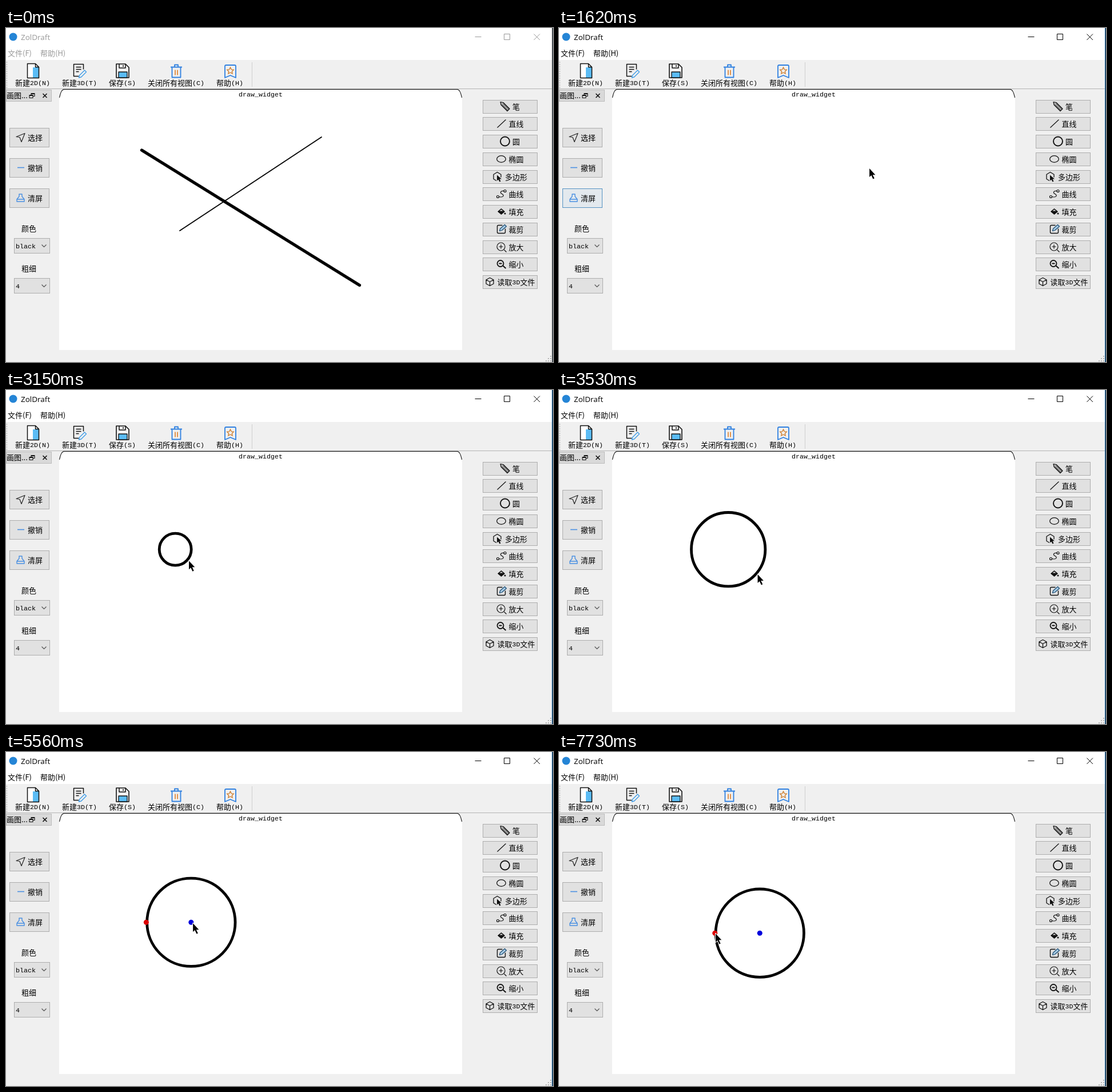
An HTML page with a canvas for the animation above (8000 ms loop, 957 by 585 pixels).

```html
<!DOCTYPE html>
<html lang="zh">
<head>
<meta charset="utf-8">
<title>Paint demo</title>
<style>
html, body { margin: 0; width: 100%; height: 100%; overflow: hidden; background: #f0f0f0; }
canvas { display: block; }
</style>
</head>
<body>
<canvas id="stage" width="957" height="585"></canvas>
<script>
const ctx = document.getElementById('stage').getContext('2d');
const LOOP = 8000;
const CJK = '"Noto Sans CJK SC", "Noto Sans CJK", sans-serif';
const MONO = '"Liberation Mono", monospace';
const BLUE = '#2f80e0', INK = '#111';

// Pointer moves; each starts where the previous one ended.
const MOVES = [
  { from: 300, to: 1000, x: 34, y: 307 },    // to the clear button
  { from: 1460, to: 1800, x: 893, y: 204 },  // to the circle button
  { from: 2230, to: 2380, x: 386, y: 311 },
  { from: 2380, to: 2760, x: 299, y: 281 },
  { from: 2920, to: 3760, x: 357, y: 331 },  // pull the radius
  { from: 3930, to: 4310, x: 300, y: 281 },
  { from: 5410, to: 5795, x: 354, y: 319 },  // drag the centre
  { from: 5795, to: 6100, x: 294, y: 313 },
  { from: 6100, to: 6420, x: 278, y: 317 },
  { from: 6420, to: 7730, x: 274, y: 318 },
];

const ramp = (t, from, to) => Math.min(1, Math.max(0, (t - from) / (to - from)));
const glide = (t, from, to) => 1 - (1 - ramp(t, from, to)) ** 1.4;
const lerp = (a, b, k) => a + (b - a) * k;
const blend = (a, b, k) => `rgb(${a.map((v, i) => Math.round(lerp(v, b[i], k))).join()})`;

function rect(x, y, w, h, fill, border) {
  ctx.fillStyle = fill;
  ctx.fillRect(x, y, w, h);
  if (border) {
    ctx.strokeStyle = border;
    ctx.lineWidth = 1;
    ctx.strokeRect(x + .5, y + .5, w - 1, h - 1);
  }
}

function shape(d, x, y, stroke, width = 1.4, fill) {
  const path = new Path2D(d);
  ctx.save();
  ctx.translate(x, y);
  ctx.lineJoin = 'round';
  if (fill) { ctx.fillStyle = fill; ctx.fill(path); }
  if (stroke) { ctx.strokeStyle = stroke; ctx.lineWidth = width; ctx.stroke(path); }
  ctx.restore();
}

function ring(x, y, rx, ry, stroke, width) {
  ctx.beginPath();
  ctx.ellipse(x, y, rx, ry, 0, 0, Math.PI * 2);
  ctx.strokeStyle = stroke;
  ctx.lineWidth = width;
  ctx.stroke();
}

function dot(x, y, r, fill) {
  ctx.beginPath();
  ctx.arc(x, y, r, 0, Math.PI * 2);
  ctx.fillStyle = fill;
  ctx.fill();
}

function star(x, y, r, color) {
  ctx.beginPath();
  for (let i = 0; i < 10; i++) {
    const a = (i / 5 - .5) * Math.PI, reach = i % 2 ? r / 2 : r;
    ctx.lineTo(x + Math.cos(a) * reach, y + Math.sin(a) * reach);
  }
  ctx.closePath();
  ctx.strokeStyle = color;
  ctx.lineWidth = 1.4;
  ctx.stroke();
}

function text(s, x, base, font, color = '#000') {
  ctx.font = font;
  ctx.fillStyle = color;
  ctx.fillText(s, x, base);
}

// Full-width characters advance 13 px, half-width ones 7 px.
const advance = s => [...s].reduce((sum, c) => sum + (c < '\x7f' ? 7 : 13), 0);

function label(s, x, mid) {
  for (const run of s.match(/[ -~]+|[^ -~]+/g)) {
    const latin = run < '\x7f';
    text(run, x, mid + (latin ? 4 : 5), latin ? `11.67px ${MONO}` : `13px ${CJK}`);
    x += advance(run);
  }
}

function button(x, y, w, h, hover = 0) {
  rect(x, y, w, h, blend([225, 225, 225], [229, 241, 251], hover), blend([173, 173, 173], [0, 120, 215], hover));
}

function drawTitle(active) {
  const ink = active ? '#000' : '#999';
  rect(0, 0, 957, 56, '#fff');
  dot(12.5, 15.5, 7, '#2585d6');
  text('ZolDraft', 26, 21, '13.5px "Open Sans", sans-serif', ink);
  text('文件(F)', 3, 49, `13px ${CJK}`, ink);
  text('帮助(H)', 60, 49, `13px ${CJK}`, ink);
  shape('M820.5 15.5h11M871.5 10.5h10v10h-10zM923.5 10.5l10.5 10.5M934 10.5l-10.5 10.5', 0, 0, ink, 1);
}

function drawToolbar() {
  for (let y = 59; y < 104; y += 4) rect(1, y, 1, 2, '#b4b4b4');
  rect(430, 60, 1, 43, '#cfcfcf');
  rect(0, 106, 955, 1, '#b4b4b4');

  shape('M0 0h14l6 6v19h-20z', 37.5, 62.5, null, 0, '#fff');
  rect(47, 69, 10, 18, '#5bbcf5');
  shape('M0 0h14l6 6v19h-20zM14 0v6h6', 37.5, 62.5, INK, 1.5);

  shape('M18 10v-9h-17v21h9M5 6h9M5 10h9M5 14h5', 117.5, 62.5, INK, 1.5);
  shape('M0 9l9-9 3 3-9 9-4 1z', 128.5, 74, '#3b9be8', 1.3, '#f0f0f0');

  shape('M1 0h16l6 6v18h-22z', 192, 63, INK, 1.6);
  shape('M5 24v-10h15v10z', 192, 63, INK, 1.3, '#5bbcf5');
  shape('M6 0v7h11v-7M13 2v3', 192, 63, INK, 1.5);

  shape('M0 4h20M7 4v-4h6v4M2.5 4v18h15v-18', 288, 64.5, BLUE, 1.8);
  shape('M8 9v9M12 9v9', 288, 64.5, '#e08a3c', 1.8);

  shape('M2 0h15q2 0 2 2v20l-9.5-4-9.5 4v-20q0-2 2-2z', 383, 65, BLUE, 1.8);
  star(392.5, 75, 6, '#d08030');

  label('新建2D(N)', 16, 96);
  label('新建3D(T)', 98, 96);
  label('保存(S)', 180, 96);
  label('关闭所有视图(C)', 248, 96);
  label('帮助(H)', 368, 96);
}

function drawCombo(value, y) {
  button(14, y, 63, 27);
  label(value, 17, y + 14);
  shape('M62.5 0l4 4 4-4', 0, y + 11.5, '#555', 1.1);
}

function drawDock(hover) {
  rect(0, 108, 80, 21, '#d9d9d9', '#bdbdbd');
  text('画图...', 1, 123, `13px ${CJK}`);
  shape('M3 3v-3h6v5h-3M0 3h6v5h-6zM0 4h6M3 1h6', 41, 114.5, INK, 1.1);
  shape('M0 0l7 7M7 0l-7 7', 64.5, 115, INK, 1.6);

  ['选择', '撤销', '清屏'].forEach((name, i) => {
    const y = 175 + i * 53;
    button(6, y, 70, 34, i === 2 ? hover : 0);
    label(name, 38, y + 17);
  });
  shape('M0 6l15-6-6 15-3-8z', 18, 184.5, '#222', 1.2);
  shape('M20 244.5h12', 0, 0, '#4a90e2', 1.6);
  shape('M4 0h5v4l4 5v4h-13v-4l4-5zM0 9h13', 19, 291, '#4a90e2', 1.4);

  label('颜色', 27, 351);
  drawCombo('black', 368);
  label('粗细', 27, 421);
  drawCombo('4', 438);
}

// Icons are drawn around their own centre.
const TOOLS = [
  ['笔', (x, y) => {
    shape('M-8-8l5 1 11 11-4 4-11-11z', x, y, INK, 1.2, '#aaa');
    shape('M-5-3l10 10M-3-5l10 10', x, y, INK, .8);
  }],
  ['直线', (x, y) => shape('M-7 7l15-14', x, y, INK, 1.2)],
  ['圆', (x, y) => ring(x, y, 8, 8, INK, 1.9)],
  ['椭圆', (x, y) => ring(x, y, 7.8, 5.8, INK, 1.3)],
  ['多边形', (x, y) => {
    shape('M-2 7l-5-3v-8l6.5-4 6.5 4v5', x, y, INK, 1.3);
    shape('M-1-3v10l2.5-2 2 4 2-1-2-4h3.5z', x, y, null, 0, INK);
  }],
  ['曲线', (x, y) => {
    shape('M-4 5c9 2 9-3 5-5s-2-6 4-5', x, y, INK, 1.2);
    ring(x - 6, y + 5, 2, 2, INK, 1.2);
    ring(x + 6.5, y - 5, 2, 2, INK, 1.2);
  }],
  ['填充', (x, y) => {
    shape('M-6 0l6-5 6 5-6 5z', x, y, INK, 1, INK);
    shape('M-3-1l3-2.5 3 2.5z', x, y, null, 0, '#ddd');
    dot(x + 6.5, y + 3.5, 1.5, INK);
  }],
  ['裁剪', (x, y) => {
    shape('M2-7h-7q-2 0-2 2v10q0 2 2 2h10q2 0 2-2v-6', x, y, INK, 1.4);
    shape('M-3 3l1-4 8-7 3 3-8 7z', x, y, '#1d4e75', 1.2, '#a9cbe4');
  }],
  ['放大', (x, y) => {
    ring(x - .5, y - .5, 7, 7, INK, 1.2);
    shape('M-4-.5h7M-.5-4v7M5 5l4 4', x, y, INK, 1.2);
  }],
  ['缩小', (x, y) => {
    ring(x - 1.5, y - 1, 5.5, 5.5, INK, 1.8);
    shape('M-4-1h5M3 3l5 4.5', x, y, INK, 2);
  }],
  ['读取3D文件', (x, y) => shape('M0-7l6.5 3.5v7l-6.5 3.5-6.5-3.5v-7zM-6.5-3.5l6.5 3.5 6.5-3.5M0 0v7', x, y, INK, 1.3)],
];

function drawTools(hover) {
  TOOLS.forEach(([name, icon], i) => {
    const top = Math.round(125.5 + i * 30.75);
    const left = 882 - (21 + advance(name)) / 2;
    button(834, top, 96, 24, i === 2 ? hover : 0);
    icon(left + 8, top + 11.5);
    label(name, left + 21, top + 12);
  });
}

function drawPaper() {
  shape('M93 564v-441q3-15 9-15h687q6 0 9 15v441z', 0, 0, null, 0, '#fff');
  shape('M93.5 122q3-14.5 8-14.5h688q5 0 8 14.5', 0, 0, INK, 1.1);
  label('draw_widget', 407, 115.5);
}

function drawLines() {
  ctx.lineCap = 'round';
  shape('M304 355L552 191', 0, 0, '#000', 1.9);
  shape('M237.5 214L618.5 450.5', 0, 0, '#000', 5.3);
  ctx.lineCap = 'butt';
}

function drawCircle(t) {
  const r = 77.2 * glide(t, 2920, 3760);
  const drag = glide(t, 5410, 5795);
  const x = lerp(296.2, 351.3, drag), y = lerp(279.2, 317.2, drag);
  ring(x, y, r, r, '#000', 4.8);
  if (t < 3930) return;
  dot(x - 78.5, y, 4.5, t < 5410 ? '#f00000' : '#dc0000');
  dot(x, y, 4.5, t < 5180 ? '#0000f5' : '#0000dc');
}

function drawPointer(t) {
  let x = 657, y = 527;
  for (const move of MOVES) {
    const k = glide(t, move.from, move.to);
    x = lerp(x, move.x, k);
    y = lerp(y, move.y, k);
  }
  const arrow = 'M0 0v15l3.3-3 3 6.5 2.4-1.1-3-6.2h4.6z';
  shape(arrow, x, y, '#fff', 2);
  shape(arrow, x, y, null, 0, '#000');
}

function draw(t) {
  const active = t >= 1300;
  rect(0, 0, 957, 585, '#f0f0f0');
  drawTitle(active);
  drawToolbar();
  drawDock(ramp(t, 850, 1000) - ramp(t, 1500, 1750));
  drawPaper();
  drawTools(ramp(t, 1700, 1900) - ramp(t, 2150, 2430));
  for (let i = 0; i < 3; i++) {
    for (let j = 0; j <= i; j++) rect(952 - j * 4, 574 + i * 4, 2, 2, '#b5b5b5');
  }
  rect(955, 0, 1, 585, active ? '#1f6fae' : '#777');
  rect(956, 0, 1, 585, '#26323c');
  if (t < 1380) drawLines();
  if (t >= 2920) drawCircle(t);
  if (t >= 300) drawPointer(t);
}

function tick() {
  draw(performance.now() % LOOP);
  requestAnimationFrame(tick);
}
tick();
</script>
</body>
</html>
```
